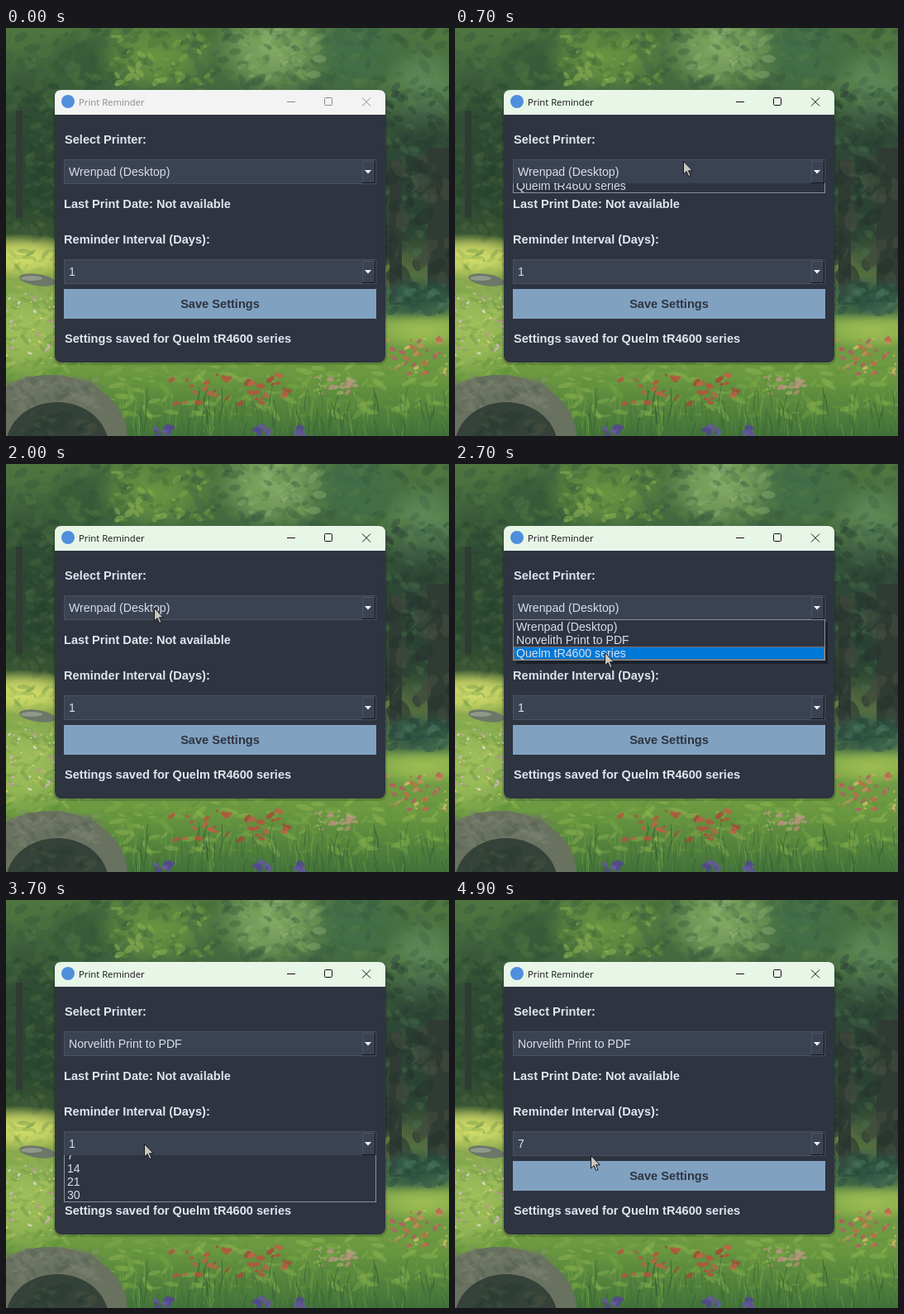
Write an HTML page with a canvas that moves like this. It is 536 px wide and 494 px high and loops after 5000 ms.

```html
<!DOCTYPE html>
<html lang="en">
<head>
<meta charset="utf-8">
<title>Print Reminder</title>
<style>
  html, body { margin: 0; width: 100%; height: 100%; overflow: hidden; background: #47663c; }
  canvas, #ui { position: absolute; left: 0; top: 0; width: 536px; height: 494px; }
  text { font: 14.15px "Liberation Sans", Arial, sans-serif; fill: #d8dee9; white-space: pre; }
  .bold { font-size: 14.6px; font-weight: bold; fill: #e0e5ee; }
  .title { font: 11.3px "Open Sans", sans-serif; }
</style>
</head>
<body>
<canvas id="scene" width="536" height="494"></canvas>
<svg id="ui" viewBox="0 0 536 494"></svg>
<script>
const LOOP = 5000, STEP = 100;
const PRINTERS = ['Wrenpad (Desktop)', 'Norvelith Print to PDF', 'Quelm tR4600 series'];
const DAYS = ['1', '7', '14', '21', '30'];

// Pointer path: time, x, y
const PATH = [
  [100, 500, 420], [600, 284, 170], [700, 276, 161], [800, 268, 164], [1200, 181, 196],
  [1500, 184, 226], [1800, 182, 190], [2000, 179, 174], [2200, 179, 174], [2500, 182, 241],
  [2600, 182, 241], [2800, 180, 214], [2900, 179, 216], [3100, 172, 255], [3200, 172, 255],
  [3300, 171, 268], [3500, 168, 292], [3800, 166, 296], [4000, 162, 332], [4400, 162, 334],
  [4900, 164, 309]
];

function paintScene() {
  const c = document.getElementById('scene').getContext('2d');
  let seed = 7;
  const rnd = () => (seed = (seed * 16807) % 2147483647) / 2147483647;

  const ellipse = (x, y, rx, ry, color, angle = 0) => {
    c.fillStyle = color;
    c.beginPath();
    c.ellipse(x, y, rx, ry, angle, 0, 7);
    c.fill();
  };
  // Soft patch of colour
  const glow = (x, y, rx, ry, color) => {
    c.save();
    c.translate(x, y);
    c.scale(rx, ry);
    const g = c.createRadialGradient(0, 0, 0, 0, 0, 1);
    g.addColorStop(0, color);
    g.addColorStop(0.5, color + 'b0');
    g.addColorStop(1, color + '00');
    c.fillStyle = g;
    c.fillRect(-1, -1, 2, 2);
    c.restore();
  };
  // Scattered brush strokes inside a box
  const dabs = (n, x, y, w, h, size, colors, alpha = 0.4, flat = 0.55) => {
    c.globalAlpha = alpha;
    for (let i = 0; i < n; i++) {
      const r = size * (0.5 + rnd());
      ellipse(x + rnd() * w, y + rnd() * h, r, r * flat,
        colors[Math.floor(rnd() * colors.length)], rnd() * 2 - 1);
    }
    c.globalAlpha = 1;
  };

  const base = c.createLinearGradient(0, 0, 0, 494);
  [[0, '#4f763f'], [0.17, '#42663f'], [0.35, '#2f4a34'], [0.5, '#3b5831'], [0.56, '#93aa4d'],
   [0.68, '#76a04a'], [0.85, '#6b9940'], [1, '#42713a']].forEach(s => base.addColorStop(...s));
  c.fillStyle = base;
  c.fillRect(0, 0, 536, 494);

  // Trees
  glow(30, 150, 75, 130, '#2c4832');
  glow(100, 45, 60, 50, '#365a37');
  glow(180, 35, 75, 48, '#699441');
  glow(325, 25, 75, 60, '#82a964');
  glow(425, 25, 70, 65, '#426e48');
  glow(505, 75, 55, 55, '#608c5a');
  glow(500, 210, 85, 150, '#2a4235');
  dabs(330, 0, 0, 536, 100, 7, ['#31523a', '#456c3d', '#587f45', '#3b6144'], 0.35);
  dabs(80, 125, 5, 125, 65, 5, ['#7aa548', '#5c8a3a', '#92b655', '#426e35'], 0.5);
  dabs(65, 285, 0, 95, 60, 6, ['#91b474', '#78a35a', '#628f50'], 0.4);
  dabs(150, 0, 70, 62, 185, 6, ['#24402c', '#3a5a3a', '#304c30', '#4b6a3d'], 0.4);
  dabs(170, 455, 70, 85, 205, 6, ['#2b4336', '#3a5b42', '#49704a', '#28372f'], 0.4);
  c.fillStyle = '#303c33';
  c.fillRect(12, 100, 8, 130);
  c.fillRect(464, 160, 15, 175);
  c.fillRect(510, 145, 30, 175);
  dabs(45, 462, 160, 76, 165, 6, ['#26342e', '#434b3d', '#35483a'], 0.6, 1.6);

  // Meadow
  glow(20, 277, 70, 28, '#d5df6b');
  glow(20, 365, 70, 65, '#a2c15d');
  glow(500, 330, 70, 32, '#2e5144');
  glow(505, 366, 70, 23, '#9cbd52');
  dabs(120, 0, 265, 62, 145, 6, ['#b7c95e', '#76a249', '#91b553', '#6b9147'], 0.4, 0.35);
  dabs(70, 455, 310, 85, 35, 6, ['#274b3b', '#3a604a', '#45735a'], 0.5);
  dabs(260, 0, 402, 536, 70, 8, ['#82ad48', '#5f913b', '#9abc53', '#729f42'], 0.38, 0.3);
  ellipse(38, 305, 22, 7, '#6c7769', 0.15);
  ellipse(31, 303, 13, 3, '#919889');

  // Grass blades
  for (let i = 0; i < 280; i++) {
    const x = rnd() * 536, y = 450 + rnd() * 50;
    c.strokeStyle = ['#3a6b35', '#598d3d', '#2e5932', '#78a548'][i % 4];
    c.globalAlpha = 0.6;
    c.beginPath();
    c.moveTo(x, y + 8);
    c.quadraticCurveTo(x, y - 5, x + rnd() * 12 - 6, y - 16);
    c.stroke();
  }
  c.globalAlpha = 1;

  // Flowers
  dabs(55, 0, 320, 60, 80, 1.8, ['#e4dfd5', '#c48aae', '#d7b2ca', '#e0d47b'], 0.8);
  dabs(36, 195, 420, 145, 36, 4, ['#b5533d', '#bd6044', '#a54a36'], 0.85);
  dabs(38, 375, 420, 48, 25, 3, ['#b79a89', '#c18d83', '#a7b270'], 0.65);
  dabs(48, 458, 376, 78, 45, 3, ['#c46a47', '#c98b62', '#b9566a', '#d9bd6b'], 0.75);
  [190, 310, 360].forEach(x => dabs(12, x - 9, 483, 18, 11, 4, ['#645a9b', '#51488c'], 0.8));

  // Stone arch
  ellipse(53, 496, 94, 76, '#69715f');
  dabs(100, 0, 424, 112, 38, 7, ['#7f8573', '#586354', '#717967'], 0.4, 0.4);
  ellipse(62, 506, 62, 53, '#354239');
  dabs(30, 20, 468, 85, 26, 7, ['#283b32', '#46533f'], 0.45);
}

const label = (x, y, s, cls = '', extra = '') => `<text x="${x}" y="${y}" class="${cls}" ${extra}>${s}</text>`;
const rect = (x, y, w, h, fill, extra = '') =>
  `<rect x="${x}" y="${y}" width="${w}" height="${h}" fill="${fill}" ${extra}/>`;
const path = (d, stroke, fill = 'none') => `<path d="${d}" stroke="${stroke}" fill="${fill}"/>`;

const combo = (y, value) =>
  rect(70.5, y + 0.5, 377, 29, '#3b4252', 'stroke="#4a5160"') +
  path(`M431.5 ${y + 28}V${y + 2.5}H446`, '#4b5364') +
  path(`M446.5 ${y + 1}V${y + 28.5}H431`, '#11151c') +
  path(`M434 ${y + 13}h8l-4 4.5z`, 'none', '#f0f2f5') +
  label(76, y + 20, value);

function dropdown(top, items, age, selected) {
  const height = items.length * 16 + 2;
  const shown = Math.round(height * ([0.24, 0.7][age / STEP] ?? 1));
  const rows = items.map((s, i) =>
    (i === selected ? rect(1.5, 1.5 + i * 16, 375, 15, '#0078d7', 'stroke="#d18a4b" stroke-dasharray="1 1"') : '') +
    label(4, 14 + i * 16, s)).join('');
  const shadow = shown === height ? rect(74, top + 4, 377, height, '#10141b', 'opacity=".6"') : '';
  return shadow + `<svg x="70" y="${top}" width="378" height="${shown}"><g transform="translate(0 ${shown - height})">` +
    rect(0.5, 0.5, 377, height - 1, '#2e3440', 'stroke="#8b909a"') + rows + '</g></svg>';
}

function pointer(t) {
  const i = Math.max(1, PATH.findIndex(p => p[0] >= t));
  const [t0, x0, y0] = PATH[i - 1], [t1, x1, y1] = PATH[i];
  const k = (t - t0) / (t1 - t0);
  return [Math.round(x0 + (x1 - x0) * k), Math.round(y0 + (y1 - y0) * k)];
}

function windowFrame(active) {
  const ink = active ? '#111' : '#8a8a8a';
  return rect(57, 76, 404, 332, '#000', 'rx="9" opacity=".15"') +
    rect(59, 75, 400, 330, '#2e3440', 'rx="8"') +
    path('M59 105V83q0-8 8-8H451q8 0 8 8V105z', 'none', active ? '#e8f6e8' : '#f3f3f3') +
    '<circle cx="75" cy="89" r="8" fill="#4f8fdc"/>' +
    label(88, 94, 'Print Reminder', 'title', `style="fill:${ink}"`) +
    path('M340 89.5h10', ink) +
    rect(385.5, 84.5, 9, 9, 'none', `stroke="${ink}" rx="1"`) +
    path('M431 84.5l10 10m0-10l-10 10', ink);
}

function render(t) {
  const [x, y] = pointer(t);
  const row = (top, items) => Math.max(0, Math.min(items.length - 1, Math.floor((y - top - 1) / 16)));
  const openList = (top, items, from, to) =>
    t >= from && t < to ? dropdown(top, items, t - from, row(top, items)) : '';

  document.getElementById('ui').innerHTML =
    windowFrame(t >= 600) +
    label(71, 140, 'Select Printer:', 'bold') +
    combo(159, PRINTERS[t < 2900 ? 0 : 1]) +
    label(70, 218, 'Last Print Date: Not available', 'bold') +
    label(70, 261, 'Reminder Interval (Days):', 'bold') +
    combo(280, DAYS[t < 4400 ? 0 : 1]) +
    rect(70, 316, 378, 36, '#81a1c1') +
    label(259, 339, 'Save Settings', 'bold', 'text-anchor="middle" style="fill:#2e3440"') +
    label(71, 381, 'Settings saved for ' + PRINTERS[2], 'bold') +
    openList(188, PRINTERS, 700, 1900) +
    openList(188, PRINTERS, 2200, 2900) +
    openList(309, DAYS, 3600, 4400) +
    (t >= 100 ? `<g transform="translate(${x} ${y})">` +
      path('M.5 .5V16l3.6-3.4 2.6 6 2.4-1-2.6-5.8h4.8z', '#15181d', '#c9c5bf') + '</g>' : '');
}

paintScene();
let shownStep = -1;
function tick() {
  const t = Math.floor(performance.now() % LOOP / STEP) * STEP;
  if (t !== shownStep) render(shownStep = t);
  requestAnimationFrame(tick);
}
tick();
</script>
</body>
</html>
```
